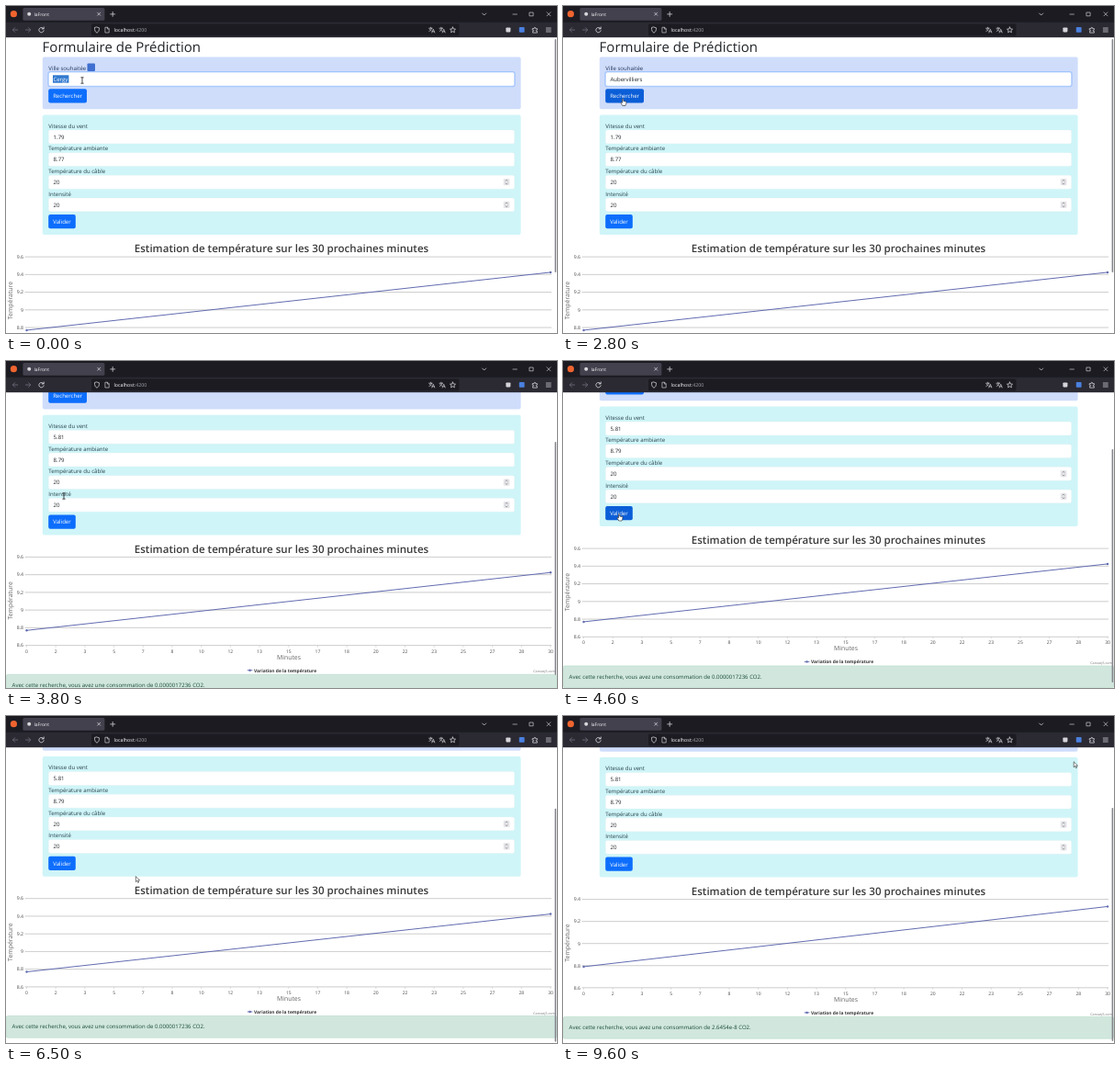
These frames come from a looping animation (600x356 px, 9.7 s). An HTML page:

```html
<!DOCTYPE html>
<html lang="fr">
<head>
<meta charset="utf-8">
<style>
html, body { margin: 0; width: 100%; height: 100%; overflow: hidden; background: #fff; }
svg { display: block; width: 600px; height: 356px; }
text { font-family: "Open Sans", "Noto Sans", sans-serif; font-size: 6.05px; fill: #212529; white-space: pre; text-rendering: geometricPrecision; }
</style>
</head>
<body>
<svg id="stage" viewBox="0 0 600 356"></svg>
<script>
const LOOP = 9700, NS = 'http://www.w3.org/2000/svg';
const stage = document.getElementById('stage');

function add(parent, tag, attrs, content) {
  const el = document.createElementNS(NS, tag);
  for (const k in attrs) el.setAttribute(k, attrs[k]);
  if (content !== undefined) el.textContent = content;
  parent.appendChild(el);
  return el;
}
const rect = (p, x, y, width, height, fill, rx = 0, more) => add(p, 'rect', { x, y, width, height, fill, rx, ...more });
const line = (p, d, stroke, width = 0.8, more) => add(p, 'path', { d, stroke, 'stroke-width': width, fill: 'none', ...more });
const dot = (p, cx, cy, r, fill) => add(p, 'circle', { cx, cy, r, fill });
function text(p, x, y, str, { size, fill, weight, anchor, rotate } = {}) {
  const el = add(p, 'text', { x, y }, str);
  if (size) el.style.fontSize = size + 'px';
  if (fill) el.style.fill = fill;
  if (weight) el.style.fontWeight = weight;
  if (anchor) el.setAttribute('text-anchor', anchor);
  if (rotate) el.setAttribute('transform', `rotate(${rotate} ${x} ${y})`);
  return el;
}
const show = (el, on) => el.setAttribute('visibility', on ? 'visible' : 'hidden');
const set = (el, str) => { if (el.textContent !== str) el.textContent = str; };

// Page
rect(stage, 0, 0, 600, 356, '#fff');
const page = add(stage, 'g', {});
const label = '#26404b';

text(page, 39.6, 49.6, 'Formulaire de Prédiction', { size: 15 });
rect(page, 39.8, 55.5, 520.8, 56.7, '#cfddfb', 2);
text(page, 46.3, 70, 'Ville souhaitée', { fill: '#26365c' });
const ring = rect(page, 45.3, 71, 509.4, 17.2, '#a9c8fb', 2.8);
const cityBox = rect(page, 46.3, 72, 507.4, 15.2, '#fff', 2, { 'stroke-width': 0.5 });
const selection = rect(page, 51, 75.3, 17.4, 8.4, '#2f78cf');
const city = text(page, 51.4, 82, '');
const badge = rect(page, 88.5, 62.5, 8.5, 8.5, '#3f6fd0', 1);

function button(y, w, str) {
  const box = rect(page, 46.2, y, w, 15.2, '#0d6efd', 2);
  text(page, 46.2 + w / 2, y + 9.9, str, { fill: '#fff', anchor: 'middle' });
  return box;
}
const search = button(90.2, 41.8, 'Rechercher');

rect(page, 39.8, 118.5, 520.8, 130.6, '#cff5f8', 2);
const fields = ['Vitesse du vent', 'Température ambiante', 'Température du câble', 'Intensité'].map((name, i) => {
  const y = 135 + i * 24.65;
  text(page, 46.3, y - 2.2, name, { fill: label });
  rect(page, 46.3, y, 507.4, 14.9, '#fff', 2, { stroke: '#dee9ec', 'stroke-width': 0.3 });
  if (i > 1) {
    rect(page, 541.7, y + 3.8, 6.8, 7.2, '#e6e6ea', 1);
    line(page, `M543.7 ${y + 6.3}l1.4-1.3 1.4 1.3M543.7 ${y + 8.5}l1.4 1.3 1.4-1.3`, '#666', 0.6);
  }
  return text(page, 51.6, y + 9.8, '20');
});
const submit = button(227.1, 29.6, 'Valider');

// Chart
const X0 = 22.5, X1 = 593, TOP = 273.1, H = 96.2;
const grey = '#4a4a4a', blue = '#626cb0';
text(page, 300, 268.2, 'Estimation de température sur les 30 prochaines minutes', { size: 11.6, weight: 600, anchor: 'middle', fill: '#3a3a3a' });
text(page, 7.4, 320.6, 'Température', { size: 6.9, fill: '#666', anchor: 'middle', rotate: -90 });
text(page, 308, 384.4, 'Minutes', { size: 6.9, fill: '#666', anchor: 'middle' });
for (let i = 0; i <= 18; i++) {
  const x = X0 + (X1 - X0) * i / 18;
  line(page, `M${x} ${TOP + H}v2`, '#bbb', 0.5);
  text(page, x, 377.3, Math.floor(i * 5 / 3 + 0.34), { size: 5, fill: grey, anchor: 'middle' });
}

function chart(max, steps, from, to) {
  const g = add(page, 'g', {});
  const yOf = v => TOP + (max - v) / (max - 8.6) * H;
  for (let i = 0; i <= steps; i++) {
    const y = TOP + H * i / steps;
    line(g, `M20.5 ${y}H594`, '#bdbdbd', 0.75);
    text(g, 19, y + 1.8, +(max - i * 0.2).toFixed(1), { size: 5.2, fill: grey, anchor: 'end' });
  }
  const curve = line(g, '', blue, 1);
  const start = dot(g, X0, yOf(from), 1.2, blue);
  const end = dot(g, X1, yOf(to), 1.2, blue);
  return {
    g, start,
    draw(k) {
      curve.setAttribute('d', `M${X0} ${yOf(from)}L${X0 + (X1 - X0) * k} ${yOf(from + (to - from) * k)}`);
      show(start, k > 0);
      show(end, k === 1);
    }
  };
}
const before = chart(9.6, 5, 8.77, 9.425);
const after = chart(9.4, 4, 8.79, 9.335);

line(page, 'M262.8 396.4h5.6', blue, 0.9);
dot(page, 265.6, 396.4, 1.2, blue);
text(page, 270, 398.2, 'Variation de la température', { size: 4.9, weight: 700, fill: '#333' });
text(page, 598, 399, 'CanvasJS.com', { size: 3.7, fill: '#777', anchor: 'end' });

rect(page, 0.2, 400.9, 599.6, 23.8, '#d1e7dd', 2, { stroke: '#a9d2bf', 'stroke-width': 0.5 });
const note = text(page, 6.6, 414.7, '', { fill: '#174a36' });

const tip = add(page, 'g', {});
rect(tip, 27.4, 258.8, 91.2, 18.2, '#000', 1, { opacity: 0.15 });
rect(tip, 26.6, 257.9, 91, 18, '#fff', 1, { stroke: '#8d93b5', 'stroke-width': 0.6 });
text(tip, 28.8, 265.2, '0', { size: 5.3, weight: 700 });
text(tip, 28.8, 272.2, 'Variation de la température:', { size: 5.35, fill: blue });
text(tip, 104.4, 272.2, '8.77', { size: 5.1, weight: 700 });

const thumb = rect(stage, 597.6, 36, 1.6, 254, '#85858d', 0.8);

// Browser chrome
const bar = add(stage, 'g', { 'stroke-linecap': 'round', 'stroke-linejoin': 'round' });
const pale = '#e4e4ea', dim = '#71707c';
rect(bar, 0, 0, 600, 18, '#1c1b22');
rect(bar, 0, 17.8, 600, 16.4, '#2b2a33');
rect(bar, 18.4, 2, 89, 13.8, '#42414d', 1.5);
rect(bar, 93, 19.4, 400.5, 13.2, '#1c1b22', 1.5);
dot(bar, 8.4, 8.7, 3.6, '#f0642f');
dot(bar, 25.2, 8.8, 2, '#d8d8dc');
text(bar, 30.4, 10.6, 'IaFront', { size: 5, fill: '#fbfbfe' });
line(bar, 'M99.7 7.2l3 3m0-3l-3 3M116.2 6.4v5m-2.5-2.5h5M518.7 8l2 2 2-2', pale, 0.7);
line(bar, 'M552 9h4.4M570.3 7h3.8v3.8h-3.8zM589 6.8l4 4m0-4l-4 4', pale, 0.6);
line(bar, 'M12.7 26H7.4m2.3-2.4L7.3 26l2.4 2.4M21.4 26h5.3m-2.3-2.4l2.4 2.4-2.4 2.4', dim, 0.8);
line(bar, 'M40.8 24.6a2.7 2.7 0 1 0 .4 2.2M41.2 22.9v2h-2', pale, 0.8);
line(bar, 'M99 23l2.5.8c0 3-.6 4.4-2.5 5.4-1.9-1-2.5-2.4-2.5-5.4z', pale, 0.7);
line(bar, 'M108.3 23.2h2.3l1.6 1.6v4.2h-3.9zM110.4 23.3v1.7h1.7', pale, 0.6);
const url = text(bar, 117.4, 28, 'localhost', { size: 5.35, fill: '#fbfbfe' });
add(url, 'tspan', { fill: '#a3a3ab', style: 'fill:#a3a3ab' }, ':4200');
for (const x of [463.6, 475]) {
  line(bar, `M${x - 3} 24.2h3.6m-1.8-1v1m1.2 0c-.4 1.8-1.6 2.8-2.8 3.3m.4-2.4c.5 1 1.2 1.6 2 2M${x + 0.2} 29l1.5-3.8 1.5 3.8m-2.5-1.2h2`, pale, 0.6);
}
const star = [...Array(10)].map((_, i) => {
  const r = i % 2 ? 1.5 : 3.2, a = i * Math.PI / 5;
  return `${486.5 + r * Math.sin(a)} ${26.2 - r * Math.cos(a)}`;
});
line(bar, `M${star.join('L')}z`, pale, 0.7);
rect(bar, 544.4, 23.4, 5, 5, '#d4d4da', 0.8);
rect(bar, 558.8, 23, 5.8, 5.8, '#4a80e0', 0.8);
line(bar, 'M573.6 24.6h1.5c-.4-1.8 2-1.8 1.6 0h1.7v1.5c-1.7-.3-1.7 1.8 0 1.5v1.5h-4.8v-1.6c1.6.2 1.6-1.7 0-1.4z', pale, 0.7);
line(bar, 'M588.3 24h5m-5 2h5m-5 2h5', pale, 0.7);

// Pointer shapes
const pointers = {
  beam: add(stage, 'g', {}), hand: add(stage, 'g', {}), arrow: add(stage, 'g', {})
};
line(pointers.beam, 'M-1.6-3.2h3.2M0-3.2v6.4M-1.6 3.2h3.2', '#222', 0.8);
const outline = { 'stroke-width': 0.6, stroke: '#222', fill: '#fff', 'stroke-linejoin': 'round' };
add(pointers.hand, 'path', { ...outline, d: 'M-1.4 .8v-4q.6-.9 1.2 0v2.2l2.6.6q.7.2.6 1L2.6 2.6 2 4h-3.2L-2.9 1.2q-.1-1 .7-.8z' });
add(pointers.arrow, 'path', { ...outline, d: 'M0 0v5.9l1.4-1.2 1 2.2 1-.5-1-2.1h1.9z' });

// Timelines: [time, x, y, pointer] and [start, end, scroll]
const moves = [
  [0, 83, 81, 'beam'], [2000, 83, 81, 'beam'], [2600, 66, 104.5, 'hand'], [3100, 66, 104.5, 'hand'],
  [3500, 63, 147, 'beam'], [3900, 63, 147, 'beam'], [4450, 62, 170, 'hand'], [4950, 62, 170, 'hand'],
  [5350, 107.3, 204.8, 'arrow'], [5550, 107.3, 204.8, 'arrow'], [6050, 141.3, 174.6, 'arrow'],
  [8700, 141.3, 174.6, 'arrow'], [9400, 556.2, 49.8, 'arrow']
];
const scrolls = [[3250, 3550, 38.4], [3630, 3900, 69], [5030, 5250, 74.4], [6950, 6951, 73.5]];
const clamp = v => Math.max(0, Math.min(1, v));
const ease = v => v * v * (3 - 2 * v);

function pointerAt(t) {
  const i = moves.findIndex(m => m[0] > t);
  if (i < 0) return moves[moves.length - 1].slice(1);
  const [t0, x0, y0, a] = moves[i - 1], [t1, x1, y1, b] = moves[i];
  const k = ease((t - t0) / (t1 - t0));
  return [x0 + (x1 - x0) * k, y0 + (y1 - y0) * k, k > 0.6 ? b : a];
}

function render(t) {
  const scroll = scrolls.reduce((s, [a, b, to]) => s + (to - s) * ease(clamp((t - a) / (b - a))), 0);
  page.setAttribute('transform', `translate(0 ${-scroll})`);
  thumb.setAttribute('y', 36 + scroll * 0.87);

  const typing = t >= 600, focused = t < 3100;
  set(city, typing ? 'Aubervilliers'.slice(0, 1 + Math.floor((t - 600) / 105)) : 'Cergy');
  city.style.fill = typing ? '#212529' : '#fff';
  show(selection, !typing);
  show(badge, !typing);
  show(ring, focused);
  cityBox.setAttribute('stroke', focused ? '#86b7fe' : '#dee2e6');

  const found = t >= 3200, updated = t >= 6950;
  set(fields[0], found ? '5.81' : '1.79');
  set(fields[1], found ? '8.79' : '8.77');
  set(note, `Avec cette recherche, vous avez une consommation de ${updated ? '2.6454e-8' : '0.0000017236'} CO2.`);
  before.g.setAttribute('display', updated ? 'none' : 'inline');
  after.g.setAttribute('display', updated ? 'inline' : 'none');
  before.draw(1);
  after.draw(clamp((t - 7157) / 1200));
  const hovered = t >= 5250 && t < 5750;
  show(tip, hovered);
  before.start.setAttribute('r', hovered ? 2 : 1.2);

  const [x, y, kind] = pointerAt(t);
  for (const k in pointers) {
    show(pointers[k], k === kind);
    pointers[k].setAttribute('transform', `translate(${x} ${y})`);
  }
  const shade = on => on ? '#0b5ed7' : '#0d6efd';
  search.setAttribute('fill', shade(kind === 'hand' && t < 3300));
  submit.setAttribute('fill', shade(kind === 'hand' && t > 3300));
}

const begin = performance.now();
function tick() {
  render((performance.now() - begin) % LOOP);
  requestAnimationFrame(tick);
}
tick();
</script>
</body>
</html>
```
